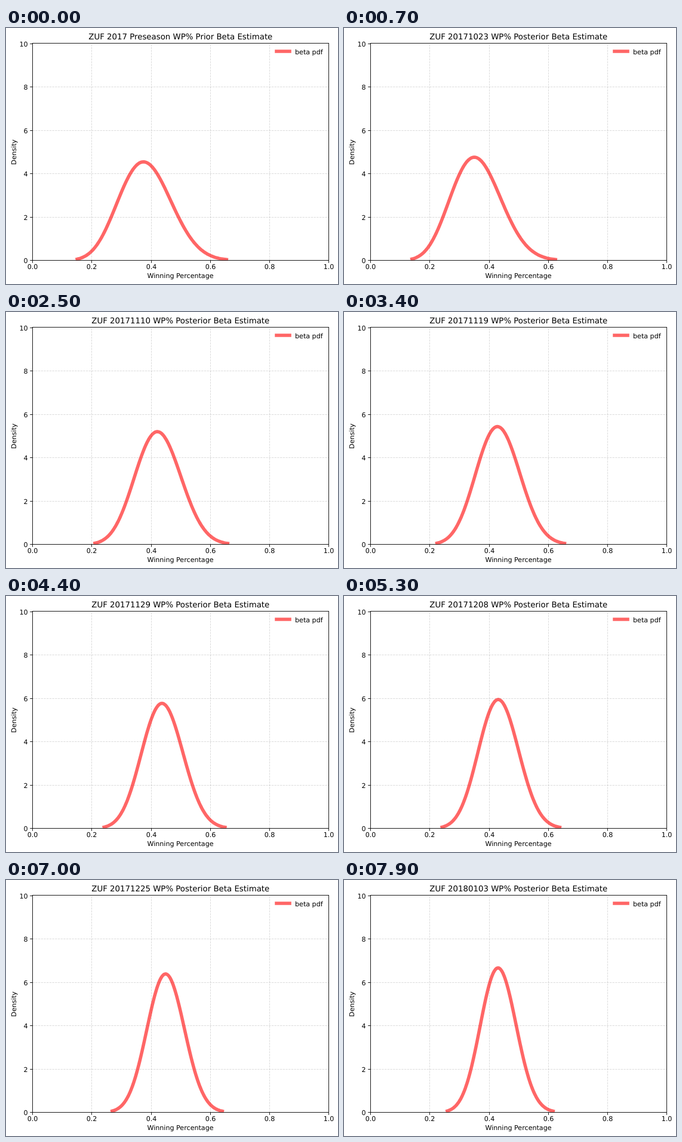
Write an HTML page that moves like this. It is 556x428 px and loops after 8 s.

```html
<!DOCTYPE html>
<html lang="en">
<head>
<meta charset="utf-8">
<title>Beta estimate</title>
<style>
  html, body { margin: 0; width: 100%; height: 100%; overflow: hidden; background: #fff; }
  svg { display: block; }
  text { font: 11.11px "DejaVu Sans", Verdana, sans-serif; text-rendering: geometricPrecision; }
  #title { font-size: 13.33px; }
  .grid { stroke: #b0b0b0; stroke-opacity: .5; stroke-width: .89; stroke-dasharray: 3.29 1.42; }
  .axis { stroke: #000; stroke-width: .89; fill: none; }
  .pdf { stroke: #f00; stroke-opacity: .6; stroke-width: 5.56; stroke-linecap: square; stroke-linejoin: round; fill: none; }
</style>
</head>
<body>
<svg id="plot" width="556" height="428" viewBox="0 0 556 428">
  <clipPath id="area"><rect x="44" y="26" width="496" height="363"/></clipPath>
  <g id="grid"></g>
  <g clip-path="url(#area)"><path id="curve" class="pdf"/></g>
  <g id="axes"><rect class="axis" x="44.5" y="25.5" width="496" height="363"/></g>
  <path class="pdf" d="M453 39H475"/>
  <text x="484" y="44">beta pdf</text>
  <text id="title" x="292.3" y="19" text-anchor="middle"></text>
  <text x="292" y="418" text-anchor="middle">Winning Percentage</text>
  <text transform="translate(17 207.5) rotate(-90)" text-anchor="middle">Density</text>
</svg>
<script>
const LEFT = 44.2, BOTTOM = 388.6, WIDTH = 496, HEIGHT = 362.4;
const STEP = 100, DAYS = 80;
const PRIOR = { a: 11.88, b: 19.13 };
// Days on which a game was won or lost, counted from the preseason
const WINS = [11, 13, 14, 18, 20, 22, 26, 30, 35, 37, 44, 51, 55, 57, 59, 61, 66, 75];
const LOSSES = [3, 5, 8, 16, 23, 28, 32, 39, 40, 42, 48, 49, 54, 63, 67, 70, 72, 73, 78, 79];

const $ = id => document.getElementById(id);
const px = x => LEFT + x * WIDTH;
const py = y => BOTTOM - y / 10 * HEIGHT;

function add(parent, tag, attrs, text = '') {
  const el = document.createElementNS('http://www.w3.org/2000/svg', tag);
  for (const key in attrs) el.setAttribute(key, attrs[key]);
  el.textContent = text;
  $(parent).append(el);
}

// Straight lines sit on whole pixels
function drawAxes() {
  for (let i = 0; i <= 5; i++) {
    const x = Math.round(px(i / 5)) + .5;
    const y = Math.round(py(i * 2) - .5) + .5;
    if (i > 0 && i < 5) {
      add('grid', 'path', { class: 'grid', d: `M${x} 388.5V25.5` });
      add('grid', 'path', { class: 'grid', d: `M44.5 ${y}H540.5` });
    }
    add('axes', 'path', { class: 'axis', d: `M${x} 388.5v4.3M44.5 ${y}h-4.3` });
    add('axes', 'text', { x, y: 403, 'text-anchor': 'middle' }, (i / 5).toFixed(1));
    add('axes', 'text', { x: 36.6, y: y + 4.5, 'text-anchor': 'end' }, i * 2);
  }
}

// Path of the beta density between its 0.1% and 99.9% quantiles
function betaPath(a, b) {
  const n = 4000;
  const mode = (a - 1) / (a + b - 2);
  const shape = x => Math.exp((a - 1) * Math.log(x / mode) + (b - 1) * Math.log((1 - x) / (1 - mode)));
  const sums = [0];
  for (let i = 0; i < n; i++) sums.push(sums[i] + shape((i + .5) / n) / n);
  const total = sums[n];
  const quantile = p => {
    const i = sums.findIndex(s => s >= p * total);
    return (i - 1 + (p * total - sums[i - 1]) / (sums[i] - sums[i - 1])) / n;
  };
  const lo = quantile(.001), hi = quantile(.999);
  const points = Array.from({ length: 100 }, (_, i) => {
    const x = lo + (hi - lo) * i / 99;
    return px(x).toFixed(2) + ' ' + py(shape(x) / total).toFixed(2);
  });
  return 'M' + points.join('L');
}

const countTo = (list, day) => list.filter(d => d <= day).length;

function titleOf(day) {
  if (day === 0) return 'ZUF 2017 Preseason WP% Prior Beta Estimate';
  const date = new Date(Date.UTC(2017, 9, 16 + day)).toISOString().slice(0, 10).replace(/-/g, '');
  return `ZUF ${date} WP% Posterior Beta Estimate`;
}

const days = Array.from({ length: DAYS }, (_, day) => ({
  title: titleOf(day),
  path: betaPath(PRIOR.a + countTo(WINS, day), PRIOR.b + countTo(LOSSES, day))
}));

let shown = -1;
function show(day) {
  if (day === shown) return;
  shown = day;
  $('title').textContent = days[day].title;
  $('curve').setAttribute('d', days[day].path);
}

drawAxes();
show(0);
const start = performance.now();
function tick() {
  show(Math.floor((performance.now() - start) / STEP) % DAYS);
  requestAnimationFrame(tick);
}
requestAnimationFrame(tick);
</script>
</body>
</html>
```
